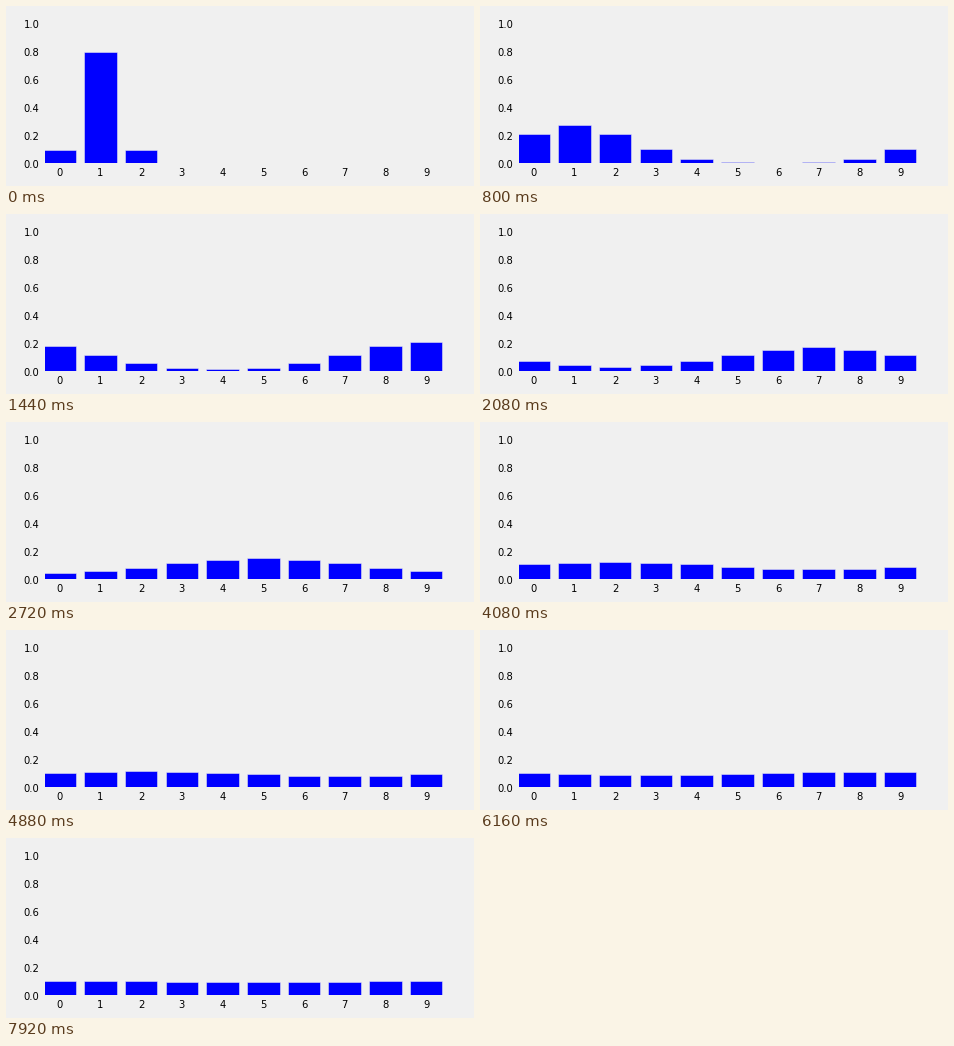
Animation of 468 by 180 pixels, one loop 8 s. Source, as a matplotlib script:

```python
import numpy as np
import matplotlib.pyplot as plt
from matplotlib.animation import FuncAnimation

CELLS, STEPS, INTERVAL = 10, 100, 80
KERNEL = {-1: 0.1, 0: 0.8, 1: 0.1}
BACKGROUND = '#f0f0f0'

plt.rcParams.update({'font.family': 'DejaVu Sans', 'font.size': 10})


def predict(belief):
    """Move one cell right on a circular track, blurred by the kernel."""
    return sum(w * np.roll(belief, 1 + k) for k, w in KERNEL.items())


beliefs = [predict(np.eye(CELLS)[0])]
while len(beliefs) < STEPS:
    beliefs.append(predict(beliefs[-1]))

fig = plt.figure(figsize=(6.5, 2.5), dpi=72, facecolor=BACKGROUND)
fig.subplots_adjust(left=0.08, right=0.95, bottom=0.125, top=0.9)
ax = fig.add_subplot(facecolor=BACKGROUND)

x = np.arange(CELLS)
bars = ax.bar(x, beliefs[0], width=0.8, align='edge',
              color='#0000ff', edgecolor=BACKGROUND, linewidth=0.5)
ax.set_xlim(0, CELLS)
ax.set_ylim(0, 1)
ax.set_xticks(x + 0.4, [str(i) for i in x])
ax.set_yticks(np.linspace(0, 1, 6))
ax.tick_params(length=0, pad=4)
# Thick background-coloured spines trim the bars at the axes border.
for spine in ax.spines.values():
    spine.set(color=BACKGROUND, linewidth=3)


def update(step):
    for bar, p in zip(bars, beliefs[step]):
        bar.set_height(p)
    return bars


anim = FuncAnimation(fig, update, frames=STEPS, interval=INTERVAL,
                     repeat=True, repeat_delay=0)
plt.show()
```
